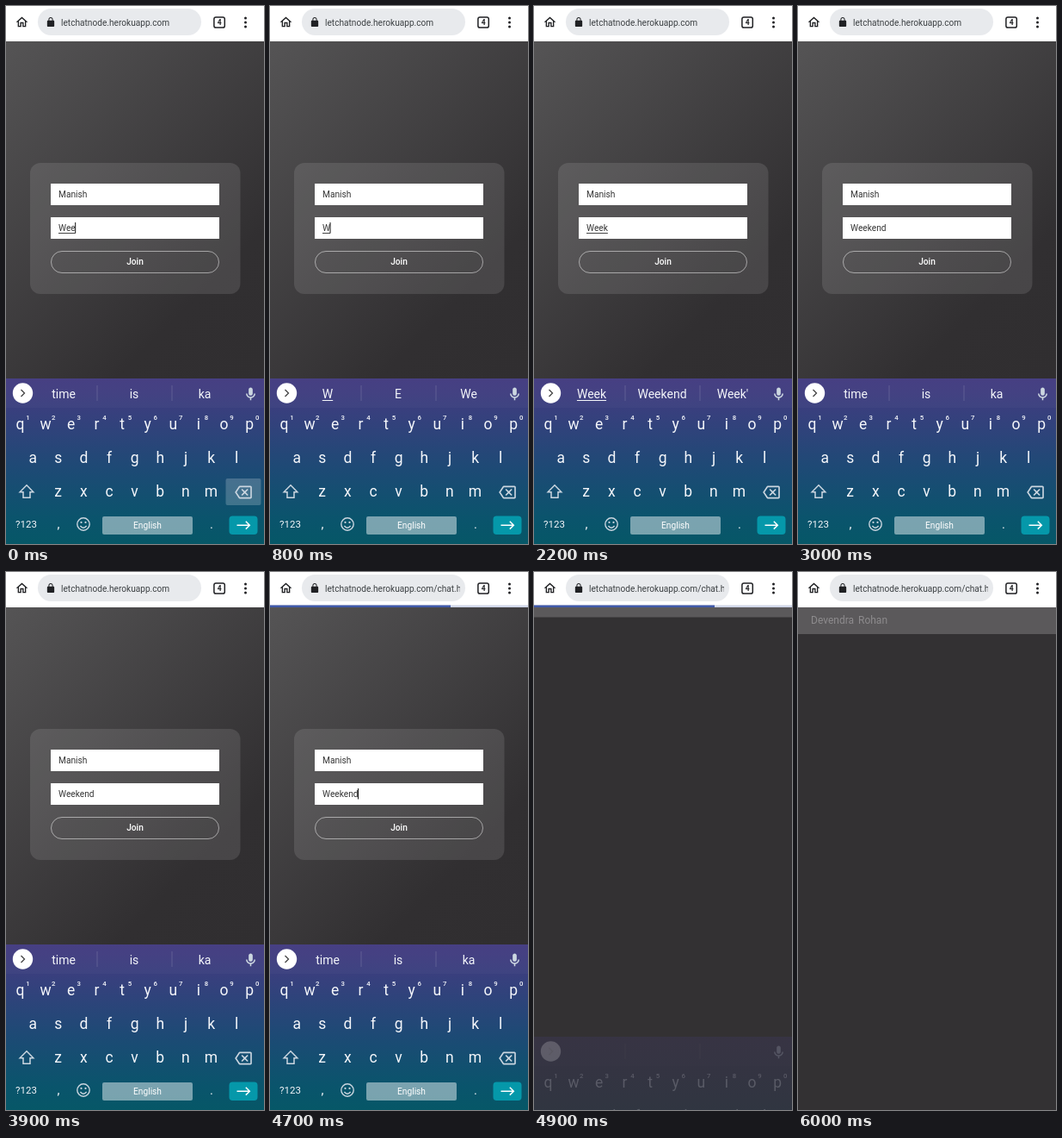
These frames come from a looping animation (300x624 px, 7.1 s). An HTML page with a canvas:

```html
<!DOCTYPE html>
<html lang="en">
<head>
<meta charset="utf-8">
<title>Joining a chat room</title>
<style>
html, body { margin: 0; width: 100%; height: 100%; overflow: hidden; background: #333133; }
canvas { display: block; width: 300px; height: 624px; }
</style>
</head>
<body>
<canvas id="stage"></canvas>
<script>
const W = 300, H = 624, LOOP = 7100, STEP = 100;
const FONT = 'Roboto, "Open Sans", sans-serif';
const canvas = document.getElementById('stage');
const c = canvas.getContext('2d');
const dpr = window.devicePixelRatio || 1;
canvas.width = W * dpr;
canvas.height = H * dpr;

const ICONS = {
  home: 'M12 5.69l5 4.5V18h-2v-6H9v6H7v-7.81l5-4.5M12 3L2 12h3v8h6v-6h2v6h6v-8h3z',
  lock: 'M18 8h-1V6c0-2.76-2.24-5-5-5S7 3.24 7 6v2H6c-1.1 0-2 .9-2 2v10c0 1.1.9 2 2 2h12c1.1 0 2-.9 2-2V10c0-1.1-.9-2-2-2zM15.1 8H8.9V6c0-1.71 1.39-3.1 3.1-3.1s3.1 1.39 3.1 3.1z',
  mic: 'M12 14c1.66 0 3-1.34 3-3V5c0-1.66-1.34-3-3-3S9 3.34 9 5v6c0 1.66 1.34 3 3 3zM17 11c0 2.76-2.24 5-5 5s-5-2.24-5-5H5c0 3.53 2.61 6.43 6 6.92V21h2v-3.08c3.39-.49 6-3.39 6-6.92z',
  erase: 'M22 3H7c-.69 0-1.23.35-1.59.88L0 12l5.41 8.11c.36.53.9.89 1.59.89h15c1.1 0 2-.9 2-2V5c0-1.1-.9-2-2-2zm0 16H7.07L2.4 12l4.66-7H22zm-11.59-2L14 13.41 17.59 17 19 15.59 15.41 12 19 8.41 17.59 7 14 10.59 10.41 7 9 8.41 12.59 12 9 15.59z'
};

// Field contents: start time, text
const TYPED = [[0, 'Wee'], [300, 'We'], [600, 'W'], [1000, 'We'], [1300, 'Wee'], [1500, 'Week'], [2300, 'Weekend']];
const IDLE = ['time', 'is', 'ka'];
const HINTS = {
  W: ['W', 'E', 'We'],
  We: ['We', 'Week', 'Were'],
  Wee: ['Wee', 'Week', 'Weekend'],
  Week: ['Week', 'Weekend', "Week'"]
};

function rect(x, y, w, h, fill, r = 0) {
  c.fillStyle = fill;
  c.beginPath();
  c.roundRect(x, y, w, h, r);
  c.fill();
}

function disc(x, y, r, fill) {
  c.fillStyle = fill;
  c.beginPath();
  c.arc(x, y, r, 0, Math.PI * 2);
  c.fill();
}

function text(str, x, y, size, fill, align = 'left', weight = 400) {
  c.font = `${weight} ${size}px ${FONT}`;
  c.textAlign = align;
  c.fillStyle = fill;
  c.fillText(str, x, y);
  return c.measureText(str).width;
}

function stroke(d, color, width) {
  c.strokeStyle = color;
  c.lineWidth = width;
  c.stroke(new Path2D(d));
}

function icon(name, x, y, scale, fill) {
  c.save();
  c.translate(x, y);
  c.scale(scale, scale);
  c.translate(-12, -12);
  c.fillStyle = fill;
  c.fill(new Path2D(ICONS[name]), 'evenodd');
  c.restore();
}

function gradient(x0, y0, x1, y1, stops) {
  const g = c.createLinearGradient(x0, y0, x1, y1);
  for (const [at, color] of stops) g.addColorStop(at, color);
  return g;
}

function toolbar(t) {
  const ink = '#202124';
  rect(0, 0, W, 41, '#fff');
  icon('home', 18.5, 18.8, 0.69, ink);
  rect(37, 3, 190, 31, '#e8eaed', 15.5);
  icon('lock', 52, 18.8, 0.52, ink);
  c.save();
  c.beginPath();
  c.rect(60, 3, 161, 31);
  c.clip();
  const path = t >= 4500 ? '/chat.html' : '';
  text('letchatnode.herokuapp.com' + path, 64, 22.7, 10.15, '#3c4043');
  c.restore();
  c.strokeStyle = ink;
  c.lineWidth = 1.5;
  c.beginPath();
  c.roundRect(241.9, 12.9, 12.4, 12.2, 2.2);
  c.stroke();
  text('4', 248.1, 22.2, 8.5, ink, 'center', 700);
  for (const y of [14, 19, 24]) disc(278.5, y, 1.5, ink);

  if (t >= 4400 && t < 5400) {
    const p = Math.min(1, (t - 4300) / 300);
    let w = 210 * (1 - (1 - p) ** 2);
    if (t >= 5200) w = t < 5300 ? 258 : W;
    rect(0, 38.5, W, 2.5, '#d0d6e8');
    rect(0, 38.5, w, 2.5, '#4059a8');
  }
}

function joinPage(t) {
  rect(0, 41, W, 392, gradient(-23, 64, 323, 409, [[0, '#555455'], [0.75, '#312f31'], [1, '#302e30']]));
  rect(28, 182, 244.5, 152, 'rgba(255,255,255,.11)', 12);
  rect(52, 206, 196, 25, '#fff');
  rect(52, 245, 196, 25, '#fff');
  text('Manish', 61, 222, 10.2, '#333');

  const [since, word] = TYPED.filter(s => s[0] <= t).pop();
  const w = text(word, 61, 261, 10.2, '#333');
  if (word !== 'Weekend') rect(61, 263, w, 1, '#444');
  if (Math.floor((t - since) / 500) % 2 === 0) rect(61 + w - 0.5, 251, 1, 12.5, '#111');

  c.strokeStyle = 'rgba(255,255,255,.5)';
  c.lineWidth = 1;
  c.beginPath();
  c.roundRect(52.5, 284.5, 195, 25, 12.5);
  c.stroke();
  text('Join', 150, 300.3, 10.2, '#fff', 'center', 500);
  return word;
}

function keyRow(letters, x, y) {
  [...letters].forEach((k, i) => text(k, x + i * 29.63, y, 17.5, '#f4f6fa', 'center'));
}

function keyboard(hints, underline, pressed) {
  const ink = '#f4f6fa', soft = '#cbd6e0';
  rect(0, 432, W, 192, gradient(0, 432, 0, 624,
    [[0, '#433a80'], [0.18, '#393f7e'], [0.55, '#1d4a75'], [0.85, '#0a546c'], [1, '#065767']]));
  rect(0, 432, W, 34, 'rgba(255,255,255,.025)');

  disc(19.5, 449, 11.7, '#fff');
  stroke('M17.5 445l4 4-4 4', '#444', 1.3);
  hints.forEach((h, i) => {
    const x = 67 + i * 82;
    const w = text(h, x, 455, 14, ink, 'center');
    if (underline && i === 0) rect(x - w / 2, 457, w, 1, ink);
  });
  for (const x of [105.5, 192.5]) rect(x, 440, 1, 18, 'rgba(255,255,255,.16)');
  icon('mic', 284.5, 450.2, 0.78, soft);

  keyRow('qwertyuiop', 16.5, 491.3);
  [...'1234567890'].forEach((k, i) => text(k, 25.5 + i * 29.63, 479.6, 7.8, ink, 'center', 500));
  keyRow('asdfghjkl', 31.2, 530);
  keyRow('zxcvbnm', 60.7, 568.6);

  stroke('M24 555.8l7.8 8h-3.8v6.4h-8v-6.4h-3.8z', soft, 1.5);
  if (pressed) rect(255.5, 548, 41, 31, 'rgba(255,255,255,.2)', 2);
  icon('erase', 276, 564, 0.82, soft);

  text('?123', 23.5, 605, 11.5, ink, 'center');
  text(',', 61, 605.5, 15, ink, 'center');
  stroke('M97.2 601a7.2 7.2 0 1 1-14.4 0a7.2 7.2 0 1 1 14.4 0M86.4 603q3.6 4.4 7.2 0', soft, 1.4);
  disc(87.5, 598.9, 1.1, soft);
  disc(92.5, 598.9, 1.1, soft);
  rect(112, 592, 105, 21, 'rgba(255,255,255,.46)', 2);
  text('English', 164.5, 606.2, 10.2, '#fff', 'center');
  text('.', 239, 605.5, 15, ink, 'center');
  rect(259.5, 591.5, 33, 21.5, '#0598aa', 4);
  stroke('M268.5 602.2h14.5M278.8 597.8l4.5 4.4-4.5 4.4', '#fff', 1.5);
}

function chatPage(t) {
  const ready = t >= 6000;
  rect(0, 41, W, H - 41, '#333133');
  rect(0, 41, W, ready ? 31 : 11.5, '#5b595b');
  if (ready) {
    text('Devendra', 15, 60, 12, '#8d8b8d');
    text('Rohan', 70, 60, 12, '#8d8b8d');
  }
  if (t < 4900) keyboard([], false, false);
  else if (t < 5000) {
    c.save();
    c.globalAlpha = 0.2;
    c.translate(0, 107);
    keyboard([], false, false);
    c.restore();
  }
}

function draw(t) {
  c.setTransform(dpr, 0, 0, dpr, 0, 0);
  if (t < 4800) {
    const word = joinPage(t);
    const hints = t < 300 ? IDLE : HINTS[word] || IDLE;
    const pressed = t < 700 && t % 300 < 200;
    keyboard(hints, hints !== IDLE, pressed);
  } else {
    chatPage(t);
  }
  toolbar(t);
}

const start = performance.now();
function tick(now) {
  const t = Math.max(0, now - start) % LOOP;
  draw(Math.floor(t / STEP) * STEP);
  requestAnimationFrame(tick);
}
draw(0);
requestAnimationFrame(tick);
</script>
</body>
</html>
```
